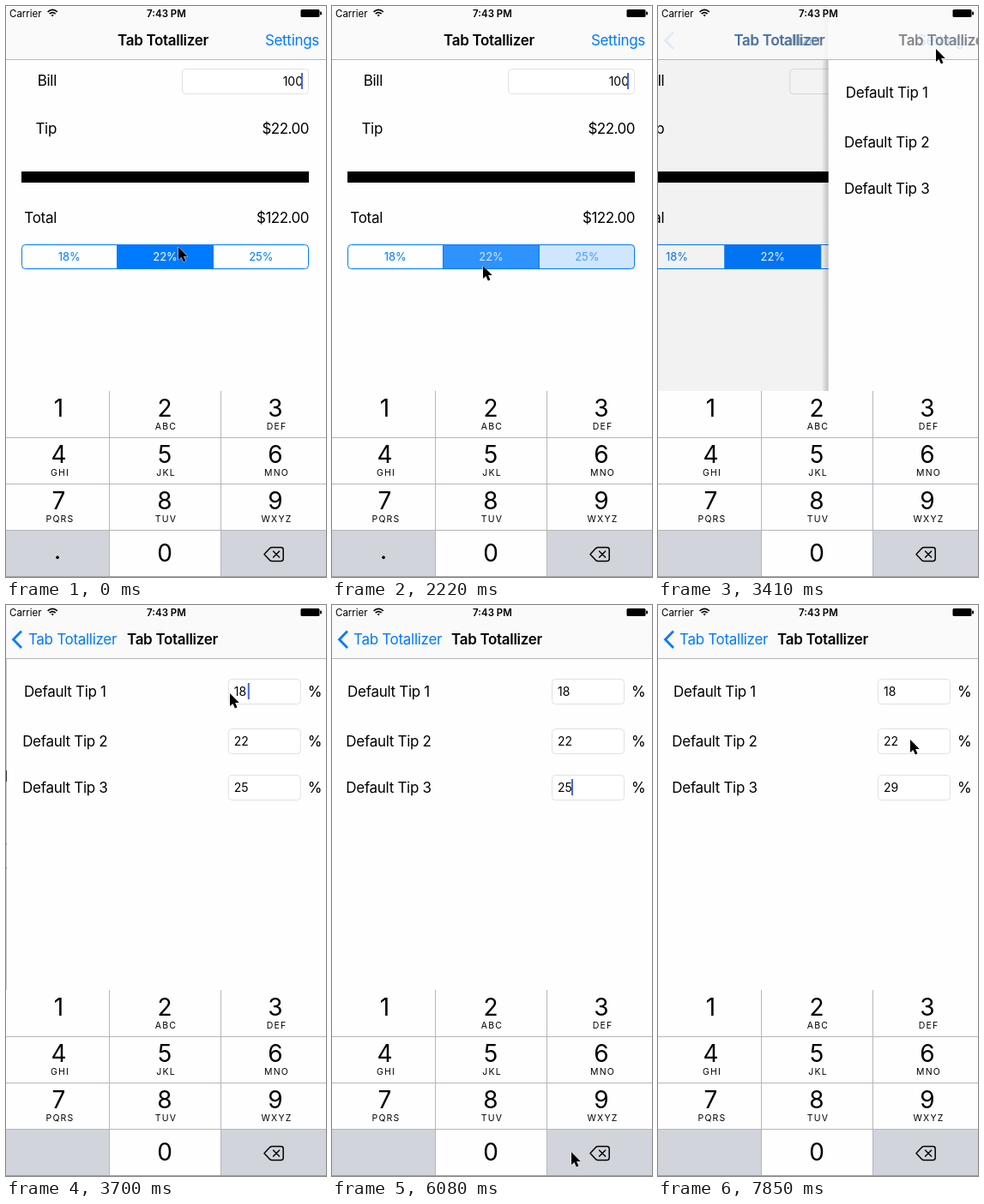
An HTML page that plays this animation: 373 px wide and 666 px high, repeating every 8000 ms.

```html
<!DOCTYPE html>
<html lang="en">
<head>
<meta charset="utf-8">
<title>Tab Totallizer</title>
<style>
  html, body { margin: 0; width: 100%; height: 100%; overflow: hidden; background: #fefefe; }
  svg { display: block; width: 373px; height: 666px; }
  text { font: 17px Inter, Roboto, sans-serif; letter-spacing: -.3px; fill: #000; white-space: pre; }
  .end { text-anchor: end; }
  .mid { text-anchor: middle; }
  .bold { font-weight: 600; }
  .blue { fill: #007aff; }
  .input { font-size: 14px; letter-spacing: 0; }
  .money { letter-spacing: -.5px; }
  .status { font-size: 11.5px; letter-spacing: 0; }
  .seg { font-size: 13px; letter-spacing: -.1px; text-anchor: middle; }
  .digit { font-size: 28px; letter-spacing: 0; text-anchor: middle; }
  .abc { font-size: 10.5px; letter-spacing: 1.2px; text-anchor: middle; }
  .field { fill: #fff; stroke: #e1e1e1; }
  .caret { fill: #4465e6; }
  .rule { stroke: #b3b6bb; }
</style>
</head>
<body>
<svg viewBox="0 0 373 666">
  <defs>
    <linearGradient id="shade">
      <stop offset="0" stop-color="#000" stop-opacity="0"/>
      <stop offset="1" stop-color="#000" stop-opacity=".22"/>
    </linearGradient>
  </defs>

  <g id="main">
    <rect width="373" height="666" fill="#fefefe"/>
    <text class="end" x="59" y="93">Bill</text>
    <text class="end" x="59" y="149">Tip</text>
    <text class="end" x="59" y="253">Total</text>
    <rect class="field" x="205.5" y="73.5" width="147" height="29" rx="4"/>
    <text class="input end" x="346" y="93">100</text>
    <rect id="billCaret" class="caret" x="344" y="78" width="2" height="19"/>
    <text id="tip" class="money end" x="353" y="149"></text>
    <rect x="18" y="193" width="335" height="13"/>
    <text id="total" class="money end" x="353" y="253"></text>
    <g id="segments"></g>
  </g>
  <rect id="dim" width="373" height="666"/>

  <g id="settings">
    <rect id="edge" x="-10" width="8" height="666" fill="url(#shade)"/>
    <rect x="-2" width="375" height="666" fill="#fefefe"/>
    <g id="rows"></g>
    <rect id="rowCaret" class="caret" x="279" width="2" height="19"/>
  </g>

  <rect width="373" height="62" fill="#fafafa" opacity=".88"/>
  <path class="rule" d="M0 62.5H373"/>
  <text id="oldTitle" class="bold" x="130" y="46">Tab Totallizer</text>
  <text id="back" class="blue" x="130" y="46">Tab Totallizer</text>
  <text id="newTitle" class="bold" x="139" y="46">Tab Totallizer</text>
  <path id="chevron" d="M18 30.5L8.5 40.2L18 50" fill="none" stroke="#007aff" stroke-width="2.8"/>
  <text id="gear" class="blue end" x="365" y="46">Settings</text>

  <text class="status" x="4" y="12.5">Carrier</text>
  <g fill="none" stroke="#000" stroke-width="1.7">
    <path d="M48.6 6.8Q54.2 1.8 59.8 6.8M50.7 9.2Q54.2 6 57.7 9.2"/>
    <path d="M52.6 10.6Q54.2 9.3 55.8 10.6L54.2 12.5Z" fill="#000" stroke="none"/>
  </g>
  <text class="status bold mid" x="187" y="12.5">7:43 PM</text>
  <rect x="343.5" y="4" width="22" height="9" rx="1.5"/>
  <rect x="366" y="6.5" width="2" height="4" rx="1"/>

  <g id="keyboard">
    <rect y="449" width="373" height="217" fill="#fefefe"/>
    <path d="M0 611H120V666H0Z" fill="#d1d4db"/>
    <rect id="delKey" x="250" y="611" width="123" height="55"/>
    <rect id="nineKey" x="250" y="557" width="123" height="54" fill="#d1d4db"/>
    <path class="rule" d="M0 503.5H373M0 557.5H373M0 611.5H373M120.5 449V666M250.5 449V666"/>
    <rect y="665" width="373" height="1" fill="#9b9ea3"/>
    <g id="keys"></g>
    <text id="dot" class="digit" x="60" y="645">.</text>
    <path d="M301 639.5L307.5 632.6Q308.6 631.5 310 631.5H320.5Q323.2 631.5 323.2 634.2V644.8Q323.2 647.5 320.5 647.5H310Q308.6 647.5 307.5 646.4ZM311.6 636L318.6 643M318.6 636L311.6 643"
      fill="none" stroke="#000" stroke-width="1.5" stroke-linejoin="round" stroke-linecap="round"/>
  </g>

  <path id="cursor" d="M0 0V15L3.4 11.9L5.9 17.4L8.5 16.2L6.1 10.9H10.8Z" stroke="#fff" stroke-width="1" paint-order="stroke"/>
</svg>

<script>
const LOOP = 8000, TICKS = 54, TICK = LOOP / TICKS;
const $ = id => document.getElementById(id);
const clamp = v => Math.max(0, Math.min(1, v));
const within = (n, spans) => spans.some(([a, b]) => n >= a && n <= b);
const show = (id, v) => $(id).setAttribute('opacity', +v);
const move = (id, x, y = 0) => $(id).setAttribute('transform', `translate(${x} ${y})`);
const label = (cls, x, y, s, id = '') => `<text class="${cls}" x="${x}" y="${y}" id="${id}">${s}</text>`;

// Static parts built from short lists
const letters = ['', 'ABC', 'DEF', 'GHI', 'JKL', 'MNO', 'PQRS', 'TUV', 'WXYZ'];
const columns = [61.5, 185, 314];
$('keys').innerHTML = letters.map((abc, i) => {
  const x = columns[i % 3], y = 479 + 54 * Math.floor(i / 3);
  return label('digit', x, y, i + 1, 'd' + i) + label('abc', x + 1.5, y + 15, abc, 'a' + i);
}).join('') + label('digit', 185, 648, 0, 'zero');

$('rows').innerHTML = [[86.5, 18], [144.5, 22], [198.5, 25]].map(([y, v], i) =>
  label('mid', 66, y + 20.3, 'Default Tip ' + (i + 1), 'row' + i) +
  `<rect class="field" x="256.5" y="${y}" width="84" height="29" rx="4"/>` +
  label('input', 263, y + 19.5, v, 'rate' + i) +
  label('', 349, y + 20.3, '%', 'pct' + i)).join('');

const segs = [[18, 111.5, '18%'], [129.5, 112, '22%'], [241.5, 111.5, '25%']];
$('segments').innerHTML =
  '<clipPath id="round"><rect x="18" y="278" width="335" height="29" rx="4"/></clipPath>' +
  segs.map(([x, w, s], i) =>
    `<rect id="fill${i}" x="${x}" y="278" width="${w}" height="29" fill="#007aff" clip-path="url(#round)"/>` +
    label('seg blue', x + w / 2, 297, s, 'off' + i) +
    label('seg" fill-opacity="1" style="fill:#fff', x + w / 2, 297, s, 'on' + i)).join('') +
  '<path d="M129.5 278V307M241.5 278V307" stroke="#007aff"/>' +
  '<rect x="18.5" y="278.5" width="334" height="28" rx="4" fill="none" stroke="#007aff"/>';

// Pointer route: tick, x, y
const route = [
  [0, 201, 281], [1, 216, 290], [3, 276, 293], [4, 276, 293], [5, 262, 312], [7, 203, 369],
  [11, 203, 369], [12, 198, 348], [14, 177, 305], [15, 176, 303], [16, 177, 302], [18, 225, 240],
  [19, 258, 180], [21, 322, 56], [23, 324, 50], [25, 261, 103], [26, 254, 112], [27, 256, 130],
  [30, 293, 209], [34, 293, 209], [35, 280, 245], [37, 218, 430], [38, 212, 520], [40, 268, 628],
  [41, 279, 638], [43, 279, 638], [45, 304, 582], [47, 304, 582], [50, 264, 260], [53, 294, 157]
];

function pointer(n) {
  const i = Math.max(1, route.findIndex(p => p[0] >= n));
  const [a, b] = [route[i - 1], route[i]];
  const k = (n - a[0]) / (b[0] - a[0]);
  return [1, 2].map(j => a[j] + (b[j] - a[j]) * k);
}

// Critically damped spring of the page push
function push(ms) {
  const s = Math.max(0, ms - 3322) / 1000 * 18.26;
  return 1 - (1 + s) * Math.exp(-s);
}

function draw(n) {
  const ms = n * TICK;

  const high = clamp((ms - 400) / 150) - clamp((ms - 2095) / 155);
  [0, 1 - high, high].forEach((v, i) => {
    show('fill' + i, v);
    show('on' + i, v);
    show('off' + i, 1 - v);
  });
  const tip = n >= 3 && n < 14 ? 25 : 22;
  $('tip').textContent = `$${tip}.00`;
  $('total').textContent = `$${100 + tip}.00`;
  show('billCaret', within(n, [[0, 2], [6, 8], [13, 15], [20, 26]]) ? 1 : n == 9 || n == 12 || n == 16 ? .4 : 0);

  const p = push(ms), done = p > .9995;
  move('main', -112 * p);
  show('dim', .1 * p * (p < 1));
  move('settings', done ? 0 : 373 * (1 - p) + (p ? 0 : 12));
  show('edge', !done);
  const slide = -105 * Math.pow(p, 1.2);
  move('oldTitle', slide);
  move('back', slide);
  move('newTitle', 262 * (1 - p));
  show('oldTitle', 1 - p);
  show('back', p);
  show('newTitle', p);
  show('chevron', p * p * p);
  show('gear', n == 22 ? .35 : Math.pow(1 - p, 3));

  const third = n >= 31;
  $('rowCaret').setAttribute('y', third ? 203 : 91);
  $('rowCaret').setAttribute('x', n == 42 || n > 42 && n < 46 ? 271 : 279);
  show('rowCaret', within(n, [[23, 26], [31, 35], [39, 48]]));
  $('rate2').textContent = n < 42 ? '25' : n < 46 ? '2' : '29';

  show('dot', n < 23);
  $('delKey').setAttribute('fill', n == 42 ? '#fefefe' : '#d1d4db');
  show('nineKey', n == 46);
  move('cursor', ...pointer(n));
}

function loop(now) {
  draw(Math.floor((now % LOOP + 13) / TICK) % TICKS);
  requestAnimationFrame(loop);
}
draw(0);
requestAnimationFrame(loop);
</script>
</body>
</html>
```
